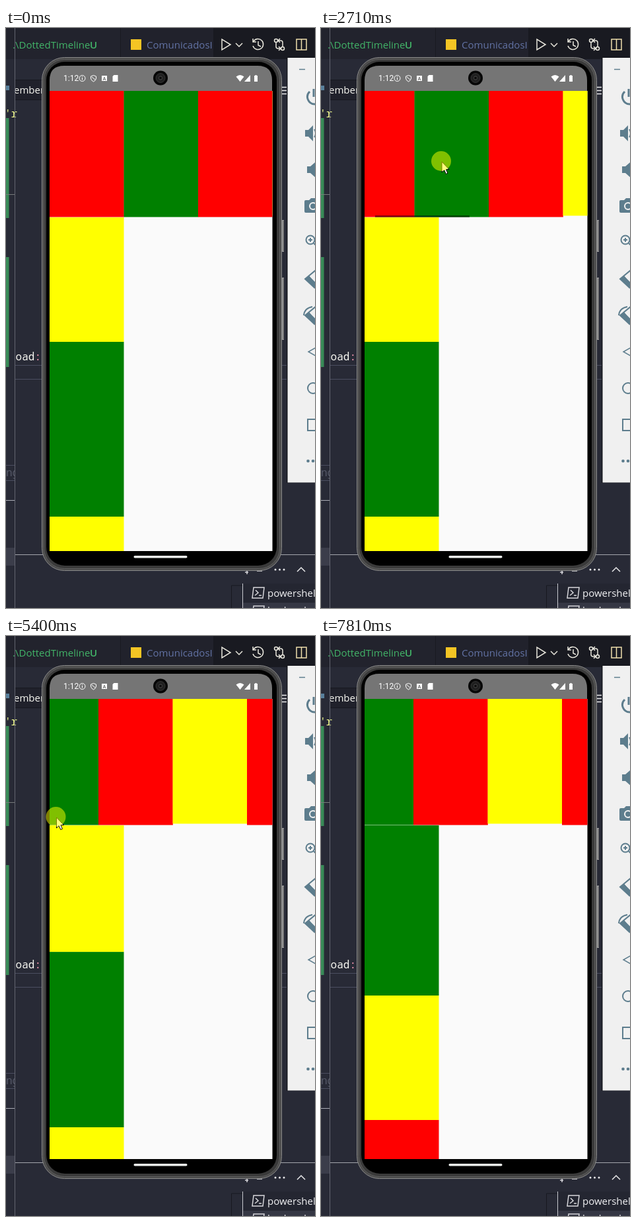
Animation of 468x876 px, one loop 8000 ms. Source, as an HTML page:

```html
<!DOCTYPE html>
<html lang="en">
<head>
<meta charset="utf-8">
<title>Scrolling table on a phone emulator</title>
<style>
  html, body { margin: 0; width: 100%; height: 100%; overflow: hidden; background: #282a36; }
  svg { display: block; }
  text { font-family: "Open Sans", "Noto Sans", sans-serif; font-size: 15px; white-space: pre; }
  .mono { font-family: "Noto Sans Mono", "DejaVu Sans Mono", monospace; font-size: 16px; }
  .line { fill: none; stroke-width: 1.5; }
  .tool { fill: none; stroke: #5d7d8d; stroke-width: 2; }
  .toolFill { fill: #5d7d8d; }
</style>
</head>
<body>
<svg width="468" height="876" viewBox="0 0 468 876">
  <!-- Editor -->
  <rect width="468" height="876" fill="#282a36"/>
  <rect width="468" height="47" fill="#191a21"/>
  <rect width="173" height="47" fill="#22232d"/>
  <rect x="174" width="140" height="47" fill="#21222c"/>
  <text x="10" y="31" fill="#42b468">.\DottedTimeline</text>
  <text x="127" y="31" fill="#42b468" font-weight="600">U</text>
  <rect x="189" y="17" width="16" height="16" fill="#f4c524"/>
  <svg width="314" height="47"><text x="213" y="31" fill="#6272a4">ComunicadosInfo</text></svg>
  <g class="line" stroke="#e8e6dc">
    <path d="M327 17v16l13-8zM348 23l5 5 5-5"/>
    <path d="M375 20a8 8 0 1 1-1 7M374 16v5h5M382 20v6l4 2"/>
    <circle cx="409" cy="19" r="2.5"/><circle cx="419" cy="31" r="2.5"/>
    <path d="M409 22v6q0 3 3 3h3m-2-3 3 3-3 3M419 28v-6q0-3-3-3h-3m2-3-3 3 3 3"/>
    <path d="M440 17h15v16h-15zM447.500 17v16" stroke="#efe0ad"/>
  </g>

  <path d="M14 78.500H60M14 108.500H60" stroke="#171820"/>
  <rect x="14" y="79" width="42" height="29" fill="#20212b"/>
  <text x="12" y="99" fill="#f8f8f2">ember</text>
  <path d="M416 89.500h10M416 94.500h10M416 99.500h10" stroke="#f0f0f0" stroke-width="1.500"/>
  <text class="mono" x="-2" y="135" fill="#f1fa8c">'r</text>
  <path d="M0 136h4.500v151H0zM0 346h4.500v166H0z" fill="#388a57"/>
  <rect y="87" width="5" height="7" fill="#587f9b"/>
  <path d="M0 251.500h13" stroke="#777b7b"/>
  <svg x="14" width="60" height="876"><text class="mono" x="-9" y="502" fill="#f8f8f2">load<tspan fill="#ff9bb6">:</tspan></text></svg>
  <path d="M14 509.500h411M14 530.500h411" stroke="#4b4e60"/>
  <path d="M0 660.500h13M0 683.500h13" stroke="#4b4e60"/>
  <svg width="13" height="876"><text class="mono" x="0" y="677" fill="#555867">ng</text></svg>
  <path d="M0 713.500h13" stroke="#a9abb4"/>
  <rect y="785" width="13" height="27" fill="#3b3d4a"/>
  <path d="M13.500 0V876" stroke="#62646f"/>
  <path d="M14 795.500h454" stroke="#a4a6ad"/>
  <path d="M365 814v11M362 822h5M380 820h8" class="line" stroke="#d8d8dc"/>
  <g fill="#e8e8ea"><circle cx="408" cy="818" r="1.500"/><circle cx="414.500" cy="818" r="1.500"/><circle cx="421" cy="818" r="1.500"/></g>
  <path d="M441 821l6-6 6 6" class="line" stroke="#e8e8ea"/>
  <path d="M341.500 876v-34h17" fill="none" stroke="#171820"/>
  <rect x="359" y="839" width="109" height="29" fill="#242631"/>
  <rect x="359" y="868" width="109" height="8" fill="#353744"/>
  <path d="M358.500 839v37" stroke="#c8c9cf"/>
  <g class="line" stroke="#d8d8dc">
    <path d="M375 845h16l-2 16h-16zM378 849l4 4-5 4M383 857h4"/>
    <path d="M375 873h16l-2 16h-16z"/>
  </g>
  <text x="396" y="859" fill="#f2f2f4">powershell</text>
  <text x="396" y="885" fill="#f2f2f4">backend</text>

  <!-- Emulator toolbar -->
  <rect x="425" y="44" width="43" height="643" fill="#15161c"/>
  <rect x="426.500" y="45" width="42" height="641.500" fill="#f0f0f0"/>
  <g class="tool">
    <path d="M444 62.500h9" stroke-width="1.500"/>
    <path d="M460 96a11 11 0 0 0 8 19M466 92v12" stroke-width="3"/>
    <path d="M467 153q4 6 0 12" />
    <circle cx="461" cy="320" r="6.500"/><path d="M458 320h6M461 317v6M466 325l6 6"/>
    <path d="M470 365l-17 14 15 14M458 375l15 15" />
    <path d="M470 420l-17 14 15 14M458 430l15 15M451 434q1-11 13-13" />
    <path d="M472 481l-14 8 14 8z" stroke-width="1.500"/>
    <circle cx="465" cy="544" r="8"/>
    <path d="M457 591h18v17h-18z"/>
  </g>
  <g class="toolFill">
    <path d="M453 154h5l7-7v24l-7-7h-5zM456 209h5l8-7v24l-8-7h-5z"/>
    <path d="M454 260h5l3-3h8v22h-16q-2 0-2-2v-15q0-2 2-2z"/>
    <path d="M453 379l6-5 12 15-3 4zM453 434l6-5 12 15-3 4z"/>
    <circle cx="457.500" cy="654" r="2.300"/><circle cx="465" cy="654" r="2.300"/>
  </g>
  <circle cx="465" cy="269" r="5" fill="#5d7d8d" stroke="#f0f0f0" stroke-width="2"/>

  <!-- Phone -->
  <path d="M417 290h4v48h-4zM417 377h4v94h-4z" fill="#a0a0a0"/>
  <path d="M420 291v46M420 378v92" stroke="#565656"/>
  <rect x="54.500" y="44.500" width="363" height="775" rx="34" fill="#4b4b4b" stroke="#8a8a8a"/>
  <rect x="57.500" y="47.500" width="357" height="769" rx="31" fill="#3a3a3a" stroke="#5e5e5e"/>
  <rect x="61" y="51" width="349" height="761" rx="28" fill="#000"/>
  <path d="M66 95V79q0-22 22-22h293q22 0 22 22v16z" fill="#757575"/>
  <rect x="66" y="95" width="337.500" height="695" fill="#fafafa"/>
  <svg x="66" y="286" width="337.500" height="504"><g id="column"></g></svg>
  <svg x="66" y="95" width="337.500" height="192">
    <g id="row"></g>
    <rect id="thumb" y="188" width="143" height="3" fill="#000" opacity="0"/>
  </svg>
  <circle cx="234" cy="75.500" r="11" fill="#060606"/>
  <circle cx="234" cy="75.500" r="7" fill="#202020" stroke="#333"/>
  <circle cx="234" cy="75.500" r="2.500" fill="#0a0a0a" stroke="#484848"/>
  <rect x="193.500" y="797" width="81" height="3.500" rx="1.700" fill="#f2f5f2"/>
  <text x="87" y="80" fill="#fff" style="font:12px Roboto, sans-serif">1:12</text>
  <g fill="none" stroke="#fff">
    <circle cx="115.500" cy="76" r="4.500"/><path d="M115.500 75v3.500M115.500 73v1"/>
    <path d="M132.500 71.500l4 1.500v3q0 3-4 5-4-2-4-5v-3zM130 74l5 4"/>
  </g>
  <path d="M145 72h8v8h-8zM163.500 71h6v10h-8v-8zM348.500 73.500q6-5 12 0l-6 7.500zM370 71v10h-9zM376 72h1.500v-1h2v1h1.500v9h-5z" fill="#fff"/>
  <path d="M147 79l2-5 2 5M148 77.500h2" fill="none" stroke="#757575"/>

  <!-- Pointer -->
  <g id="pointer">
    <path id="arrow" d="M1 1v16l3.700-3.500 2.600 6 2.600-1.200-2.500-5.700H12z" fill="#fff" stroke="#000"/>
    <path id="beam" d="M-3-8h2l1 1 1-1h2M0-7V7M-3 8h2l1-1 1 1h2" fill="none" stroke="#ddd"/>
    <circle id="press" r="15" fill="#ff0" opacity=".5"/>
  </g>
</svg>
<script>
const LOOP = 8000;
const byId = id => document.getElementById(id);
const CELL = 337.5 / 3;
const VIEW = 337.5;

function addRect(parent, fill, attrs) {
  const rect = document.createElementNS("http://www.w3.org/2000/svg", "rect");
  parent.append(rect);
  setAttrs(rect, { fill, ...attrs });
  return rect;
}
function setAttrs(node, attrs) {
  for (const name in attrs) node.setAttribute(name, attrs[name]);
}

["red", "green", "red", "yellow", "red", "green", "red"].forEach((fill, i) =>
  addRect(byId("row"), fill, {
    x: i * CELL, width: CELL + 0.3, height: fill === "yellow" ? 188.5 : 190.5
  }));

const cells = [["yellow", 188], ["green", 264], ["yellow", 188], ["red", 190], ["green", 264]];
let edge = 0;
const column = cells.map(([fill, height]) => {
  const cell = { top: edge, bottom: edge += height };
  cell.node = addRect(byId("column"), fill, { width: CELL });
  return cell;
});

// time, x, y
const path = [
  [310, 310, 663], [500, 288, 480], [730, 243, 246], [1080, 243, 246],
  [1180, 248, 188], [1400, 29, 183], [1680, 230, 180], [1745, 230, 180],
  [2030, 439, 183], [2300, 340, 184], [2640, 215, 192], [2710, 182, 201],
  [2930, 182, 201], [3040, 26, 186], [3290, 26, 186], [3450, 5, 183],
  [3600, 68, 183], [3700, 15, 275], [3800, 20, 350], [3920, 23, 416],
  [4030, 23, 437], [4130, 62, 475], [4200, 97, 490], [4270, 103, 448],
  [4335, 103, 448], [4800, 90, 190], [4900, 88, 160], [5130, 80, 60],
  [5400, 75.5, 273], [5465, 75.5, 273], [5620, 70, 300], [5900, 56, 155],
  [6080, 58, 35], [6320, 58, 315], [6580, 80, 290], [6720, 93, 182],
  [6785, 93, 182], [6860, 93, -35], [7300, 93, -35], [7530, 90, 110],
  [7800, 92, -35]
];

// time, horizontal offset
const rowScroll = [
  [1180, 0], [1400, 220], [1680, 21], [1745, 21], [1800, 0], [2560, 0],
  [2640, 10], [2710, 37], [2930, 37], [3040, 193], [3290, 193],
  [3450, 214], [3600, 151]
];

function sample(keys, t) {
  const next = keys.findIndex(key => key[0] > t);
  if (next < 0) return keys.at(-1).slice(1);
  if (next === 0) return keys[0].slice(1);
  const a = keys[next - 1], b = keys[next];
  const k = (t - a[0]) / (b[0] - a[0]);
  return a.slice(1).map((v, i) => v + (b[i + 1] - v) * k);
}
const within = (t, from, to) => t >= from && t < to;
const clamp01 = v => Math.min(1, Math.max(0, v));

function draw(t) {
  const [x, y] = sample(path, t);
  const [scrollX] = sample(rowScroll, t);
  const rowDrag = within(t, 1180, 3600);
  const columnDrag = t >= 4900;

  byId("row").setAttribute("transform", `translate(${-scrollX})`);
  setAttrs(byId("thumb"), {
    x: scrollX * VIEW / (7 * CELL),
    opacity: rowDrag ? 0.45 : t < 3600 ? 0 : 0.45 * clamp01((4050 - t) / 250)
  });

  // Dragging above the anchor scrolls; below it the list stretches.
  const pull = columnDrag ? y - 160 : 0;
  const scrollY = Math.max(0, -pull);
  const stretch = 4.2 * (1 - Math.exp(-Math.max(0, pull) / 25));
  const place = at => at - scrollY + stretch * (1 - Math.exp(-at / 135));
  for (const { node, top, bottom } of column)
    setAttrs(node, { y: place(top), height: place(bottom) - place(top) });

  const pressed = rowDrag || columnDrag;
  const overEditor = x < 52 && !pressed;
  setAttrs(byId("pointer"), {
    transform: `translate(${x} ${y})`,
    display: t < 310 ? "none" : "inline"
  });
  byId("press").setAttribute("display", pressed ? "inline" : "none");
  byId("arrow").setAttribute("display", overEditor ? "none" : "inline");
  byId("beam").setAttribute("display", overEditor ? "inline" : "none");
}

const start = performance.now();
function frame() {
  draw((performance.now() - start) % LOOP);
  requestAnimationFrame(frame);
}
frame();
</script>
</body>
</html>
```
